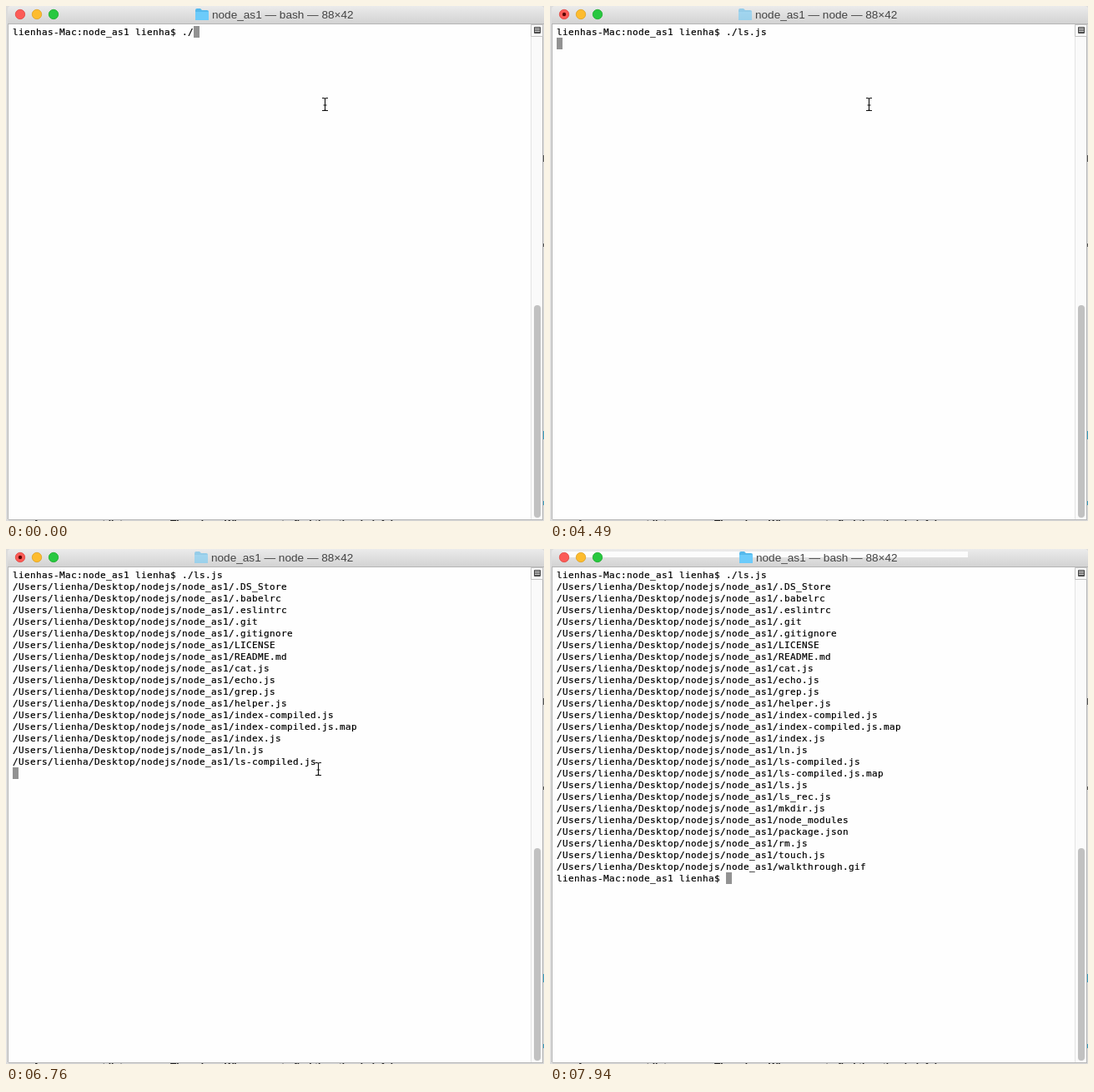
Write an HTML page that moves like this. It is 645 px wide and 618 px high and loops after 8 s.

```html
<!DOCTYPE html>
<html lang="en">
<head>
<meta charset="utf-8">
<title>Terminal</title>
<style>
  html, body { margin: 0; width: 100%; height: 100%; overflow: hidden; background: #fff; }
  svg { position: absolute; left: 0; top: 0; }
  #screen {
    position: absolute; left: 8px; top: 24px; margin: 0;
    font: 11px/14px "DejaVu Sans Mono", monospace;
    letter-spacing: calc(7px - 1ch);
    color: #000; -webkit-text-stroke: .2px #000;
    white-space: pre;
  }
  #text { position: relative; top: 1px; }
  #block { position: absolute; width: 7px; height: 14px; background: #929292; }
  #title { font: 13.6px "Liberation Sans", Arial, sans-serif; fill: #444; }
  #behind { font: bold 12px "Liberation Sans", Arial, sans-serif; fill: #222; }
</style>
</head>
<body>
<svg width="645" height="618" viewBox="0 0 645 618">
  <defs>
    <linearGradient id="bar" x2="0" y2="1">
      <stop offset="0" stop-color="#ebebeb"/>
      <stop offset="1" stop-color="#d3d3d3"/>
    </linearGradient>
    <clipPath id="strip"><path d="M0 617h645v1H0z"/></clipPath>
  </defs>

  <path fill="#dcdcdc" d="M0 0h645v618H0z"/>
  <path fill="#b4b4b4" d="M2 4h1v612H2zM643 4h1v612h-1zM3 616h641v1H3z"/>
  <g id="behind" clip-path="url(#strip)">
    <text x="32" y="626">Announcement list</text>
    <text x="197" y="626">Thread</text>
    <text x="262" y="626">Where</text>
    <text x="330" y="626">to find the other helpful pages</text>
  </g>
  <path fill="#555" d="M644 179h1v8h-1zM644 285h1v4h-1z"/>
  <path fill="#3a9fc0" d="M644 510h1v10h-1zM644 594h1v5h-1z"/>

  <path fill="#fefefe" d="M3 22h640v594H3z"/>
  <path fill="url(#bar)" d="M2 21V4q0-4 4-4h635q4 0 4 4v17z"/>
  <path fill="#b5b5b5" d="M2 21h643v1H2z"/>
  <path id="glare" fill="#fcfcfc" d="M15 3h486v7H15z"/>

  <g stroke-width=".8">
    <circle cx="17" cy="10" r="5.7" fill="#fc5b57" stroke="#e0443f"/>
    <circle cx="37" cy="10" r="5.7" fill="#fdbc2e" stroke="#dea123"/>
    <circle cx="57" cy="10" r="5.7" fill="#28c840" stroke="#1aab29"/>
  </g>
  <circle id="dirty" cx="17" cy="10" r="2.2" fill="#5c0500"/>
  <g id="folder">
    <path fill="#55b9ec" d="M227 5q0-2 2-2h4l2 2h6q2 0 2 2v9q0 1-1 1h-14q-1 0-1-1z"/>
    <path fill="#6ccbfa" d="M227 7h16v9q0 1-1 1h-14q-1 0-1-1z"/>
  </g>
  <text id="title" y="15"></text>

  <path fill="#fafafa" d="M630 22h13v594h-13z"/>
  <path fill="#e3e3e3" d="M629 22h1v594h-1z"/>
  <path fill="none" stroke="#c4c4c4" d="M629.5 22.500h14v14h-14z"/>
  <path fill="#ccc" stroke="#444" d="M633.5 25.500h7v7h-7z"/>
  <path stroke="#555" d="M634 27.500h6M634 29.500h6M634 31.500h6"/>
  <rect x="633" y="359" width="8" height="255" rx="4" fill="#c1c1c1"/>
</svg>

<div id="screen"><span id="text"></span><i id="block"></i></div>

<svg width="645" height="618" viewBox="0 0 645 618">
  <path id="pointer" fill="none" stroke="#111" stroke-width="1.1"
    d="M-3.500-7.500h2q1.500 0 1.500 1.500V6q0 1.500-1.500 1.500h-2M3.500-7.500h-2Q0-7.500 0-6M0 6Q0 7.500 1.500 7.500h2M-2 1H2"/>
</svg>

<script>
const LOOP = 8000, CELL = 7, LINE = 14;
const PROMPT = "lienhas-Mac:node_as1 lienha$ ";
const FOLDER = "/Users/lienha/Desktop/nodejs/node_as1/";
const FILES = (".DS_Store .babelrc .eslintrc .git .gitignore LICENSE README.md cat.js echo.js " +
  "grep.js helper.js index-compiled.js index-compiled.js.map index.js ln.js ls-compiled.js " +
  "ls-compiled.js.map ls.js ls_rec.js mkdir.js node_modules package.json rm.js touch.js " +
  "walkthrough.gif").split(" ");

// Each track holds [start time, value] steps.
const typed = [[0, "./"], [780, "./l"], [930, "./ls"], [1210, "./ls."], [1650, "./ls"],
  [2540, "./ls."], [2990, "./ls.j"], [3140, "./ls.js "]];
const listed = [[0, -1], [4340, 0], [6610, 14], [6760, 16], [6910, FILES.length]];
const pointerAt = [[0, [382, 118]], [6470, [315, 135]], [6610, [304, 207]],
  [6760, [374, 264]], [6910, [397, 308]], [7050, [497, 590]], [7200, null]];
const processes = [[0, "bash"], [4490, "node"], [7050, "bash"]];

const $ = id => document.getElementById(id);
const at = (track, t) => track.findLast(([start]) => start <= t)[1];
const show = (id, on) => $(id).setAttribute("visibility", on ? "visible" : "hidden");

function terminalLines(t) {
  const count = at(listed, t);
  const lines = [PROMPT + at(typed, t)];
  if (count < 0) return lines;
  lines.push(...FILES.slice(0, count).map(name => FOLDER + name));
  lines.push(count === FILES.length ? PROMPT : "");
  return lines;
}

let shown = "";
function render(t) {
  const lines = terminalLines(t);
  const pointer = at(pointerAt, t);
  const process = at(processes, t);
  const state = JSON.stringify([lines, pointer, process]);
  if (state === shown) return;
  shown = state;

  $("text").textContent = lines.join("\n");
  $("block").style.left = lines.at(-1).length * CELL + "px";
  $("block").style.top = (lines.length - 1) * LINE + "px";

  const busy = process === "node";
  $("title").textContent = `node_as1 — ${process} — 88×42`;
  $("title").setAttribute("x", busy ? 246 : 247);
  $("folder").setAttribute("opacity", busy ? .55 : 1);
  $("folder").setAttribute("transform", `translate(${busy ? -1 : 0} 0)`);
  show("dirty", busy);
  show("glare", t >= 7050);

  show("pointer", pointer);
  if (pointer) $("pointer").setAttribute("transform", `translate(${pointer[0] + .5} ${pointer[1]})`);
}

function tick() {
  render(performance.now() % LOOP);
  requestAnimationFrame(tick);
}
tick();
</script>
</body>
</html>
```
